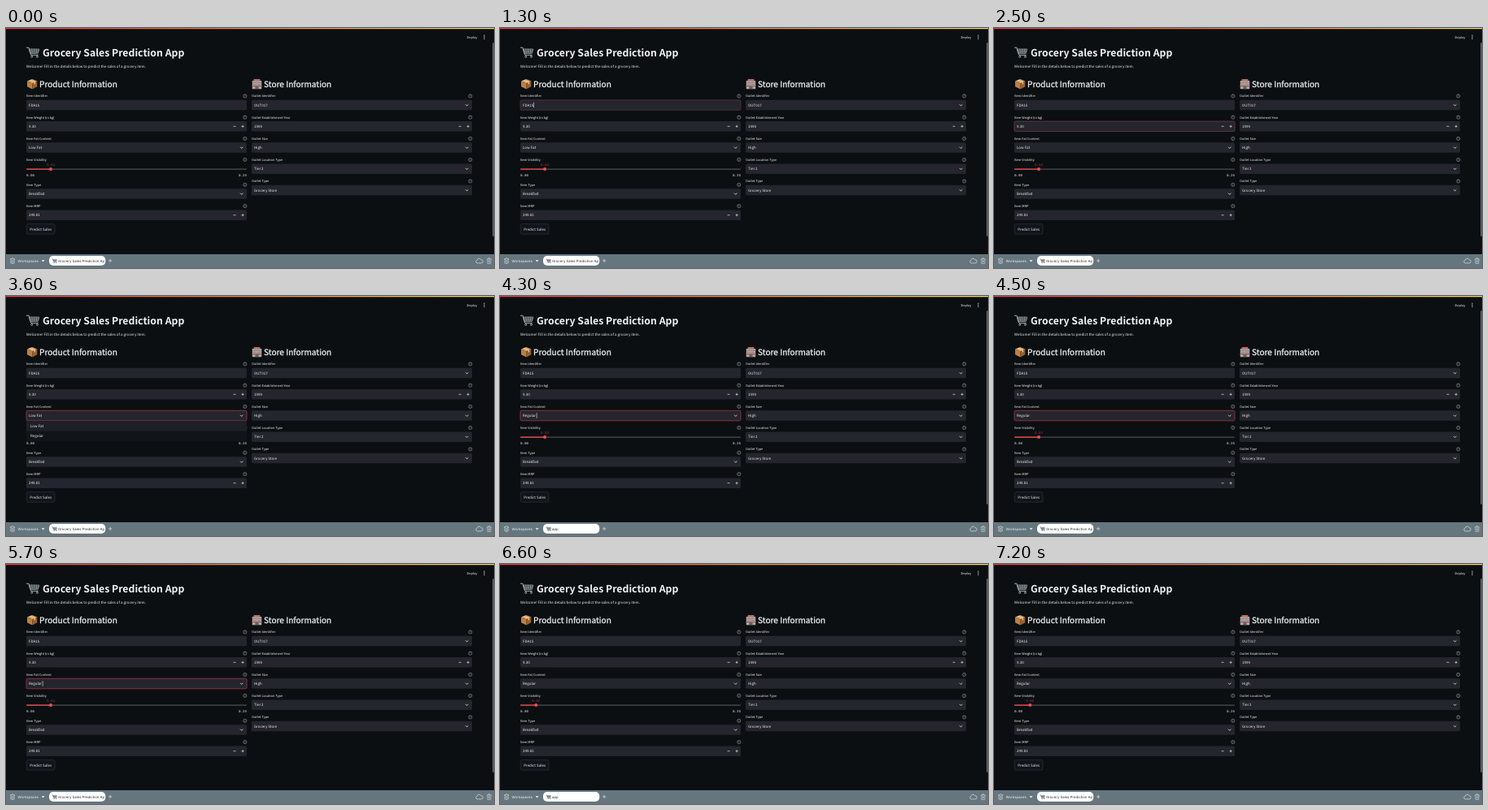
Animation of 600x296 px, one loop 8 s. Source, as an HTML page:

```html
<!DOCTYPE html>
<html lang="en">
<head>
<meta charset="utf-8">
<title>Sales form</title>
<style>
  html, body { margin: 0; width: 100%; height: 100%; overflow: hidden; background: #0b0f12; }
  svg { display: block; width: 600px; height: 296px; }
  text { font-family: "Noto Sans CJK JP", "Noto Sans CJK SC", "Noto Sans CJK", "Noto Sans", sans-serif;
         fill: #f1f2f3; text-rendering: geometricPrecision; white-space: pre; }
  .title { font-size: 12.27px; font-weight: 700; }
  .head { font-size: 10.1px; stroke: #f1f2f3; stroke-width: .25px; }
  .label { font-size: 3.95px; }
  .body { font-size: 4.48px; }
  .mono { font: 4.2px "Liberation Mono", monospace; }
  .ui { font: 4.3px Inter, sans-serif; }
  .line { fill: none; stroke: #e6e8ea; stroke-width: .65; }
  .focus { fill: none; stroke-width: .8; }
</style>
</head>
<body>
<svg id="stage" viewBox="0 0 600 296" xmlns="http://www.w3.org/2000/svg"></svg>
<script>
const LOOP = 8000;
const LEFT = 25, RIGHT = 302, WIDTH = 271, BOX = 12.5;
const ROW = [88.8, 115.05, 141.3, 167.4, 193.8];

const rect = (x, y, w, h, fill, more = '') =>
  `<rect x="${x}" y="${y}" width="${w}" height="${h}" fill="${fill}" ${more}/>`;
const text = (x, y, cls, str, more = '') =>
  `<text x="${x}" y="${y}" class="${cls}" ${more}>${str}</text>`;
const line = (d, more = '') => `<path class="line" d="${d}" ${more}/>`;
const caret = (id, x, y) => rect(x, y, .6, 6.6, '#e8e8ea', `id="${id}"`);
const focusRing = (id, y, color) =>
  rect(LEFT, y, WIDTH, BOX, 'none', `id="${id}" class="focus" rx="1.5" stroke="${color}"`);

function label(x, y, name) {
  const cx = x + WIDTH - 2.2;
  return text(x, y + 1.4, 'label', name) +
    `<circle class="line" cx="${cx}" cy="${y}" r="2.1" style="stroke-width:.4"/>` +
    text(cx, y + 1.2, 'label', '?', 'text-anchor="middle" style="font-size:3.1px"');
}

function field(x, y, name, value, kind, id = '') {
  const mid = y + BOX / 2, end = x + WIDTH;
  const icons = {
    text: '',
    select: line(`M${end - 8} ${mid - .8}l1.7 1.7l1.7 -1.7`, 'style="stroke-width:.85"'),
    number: line(`M${end - 16.4} ${mid}h3M${end - 6.4} ${mid}h3M${end - 4.9} ${mid - 1.5}v3`, 'style="stroke-width:.7"')
  };
  return label(x, y - 4.9, name) +
    rect(x, y, WIDTH, BOX, '#24252d', 'rx="1.5"') +
    text(x + 3, mid + 1.6, 'body', value, id && `id="${id}"`) + icons[kind];
}

const cart = (x, y, s, ink) => `
  <g transform="translate(${x} ${y}) scale(${s})" fill="none" stroke="${ink}" stroke-linecap="round">
    <path d="M0 1.4H2.6L5.4 10.6H14" stroke-width="1"/>
    <path d="M3.2 3.2H15.4L13.8 8.6H4.8Z" fill="${ink}" fill-opacity=".25" stroke-width=".7"/>
    <path d="M4 5H15M4.5 6.8H14.4M6.4 3.2L7 8.6M9.4 3.2V8.6M12.4 3.2L11.7 8.6" stroke-width=".55"/>
    <circle cx="6.3" cy="12.6" r="1" stroke-width=".9"/><circle cx="13" cy="12.6" r="1" stroke-width=".9"/>
  </g>`;

const parcel = `
  <path d="M26 65.5L32 63L38.3 65.5L32.4 68.4Z" fill="#d9a168"/>
  <path d="M26 65.5L32.4 68.4V75.4L26 72.2Z" fill="#bd7f45"/>
  <path d="M38.3 65.5L32.4 68.4V75.4L38.3 72.2Z" fill="#98602f"/>
  <path d="M28.4 64.5L34.8 67.2V69.6L36 69V66.6L29.8 63.9Z" fill="#efd0a0"/>`;

function shop() {
  let windows = '';
  for (let i = 0; i < 8; i++)
    windows += rect(304 + (i % 4) * 2.5, 66.6 + (i >> 2) * 2.3, 1.6, 1.3, '#62808f');
  return rect(302.8, 65, 11.4, 10.2, '#b9a9a2') + rect(304.6, 63, 7.8, 2.4, '#c9665c') + windows +
    rect(302.3, 71, 12.4, 1.3, '#a94f4a') + rect(306.4, 72.3, 4.2, 2.9, '#5a5f68');
}

const slider = `
  ${label(LEFT, 162.4, 'Item Visibility')}
  ${rect(LEFT, 173.4, WIDTH, 1.25, '#4c4e55', 'rx=".6"')}
  ${rect(LEFT, 173.4, 30, 1.25, '#f04848', 'id="filled" rx=".6"')}
  <circle id="thumb" cy="174" r="2" fill="#ff4b4b"/>
  ${text(0, 170.4, 'mono', '', 'id="amount" text-anchor="middle" style="fill:#a0353a"')}
  ${text(LEFT, 182.6, 'mono', '0.00')}
  ${text(LEFT + WIDTH, 182.6, 'mono', '0.25', 'text-anchor="end"')}`;

const menu = `
  <g id="menu">
    ${rect(LEFT, 154.2, WIDTH, 24.8, '#11151a', 'rx="1.5"')}
    ${rect(LEFT, 154.2, WIDTH, 12.3, '#1e2027', 'id="hover"')}
    ${text(30, 161.8, 'body', 'Low Fat')}
    ${text(30, 174.2, 'body', 'Regular')}
  </g>`;

const form = `
  <g id="form">
    ${parcel}${text(41, 72.6, 'head', 'Product Information')}
    ${shop()}${text(317, 72.6, 'head', 'Store Information')}
    ${field(LEFT, ROW[0], 'Item Identifier', 'FDA15', 'text')}
    ${field(LEFT, ROW[1], 'Item Weight (in kg)', '9.30', 'number')}
    ${field(LEFT, ROW[2], 'Item Fat Content', 'Low Fat', 'select', 'fat')}
    ${slider}
    ${field(LEFT, 198.2, 'Item Type', 'Breakfast', 'select')}
    ${field(LEFT, 224.5, 'Item MRP', '249.81', 'number')}
    ${rect(25.2, 241.7, 34.8, 12.5, '#11151b', 'rx="2" stroke="#3c3f46" stroke-width=".5"')}
    ${text(42.6, 249.5, 'body', 'Predict Sales', 'text-anchor="middle"')}
    ${field(RIGHT, ROW[0], 'Outlet Identifier', 'OUT017', 'select')}
    ${field(RIGHT, ROW[1], 'Outlet Establishment Year', '1999', 'number')}
    ${field(RIGHT, ROW[2], 'Outlet Size', 'High', 'select')}
    ${field(RIGHT, ROW[3], 'Outlet Location Type', 'Tier 2', 'select')}
    ${field(RIGHT, ROW[4], 'Outlet Type', 'Grocery Store', 'select')}
    ${focusRing('ringId', ROW[0], '#733a48')}
    ${focusRing('ringWeight', ROW[1], '#733a48')}
    ${focusRing('ringFat', ROW[2], '#a5394a')}
    ${caret('caretId', 41, 91.6)}
    ${caret('caretWeight', 36.3, 117.8)}
    ${caret('caretFat', 44.8, 144.2)}
    ${menu}
  </g>`;

const browserBar = `
  ${rect(0, 279, 600, 17, '#66767e')}
  ${line('M5 285.3L8 283.8L11 285.3L8 286.8ZM5 287.3L8 288.8L11 287.3M5 289.2L8 290.7L11 289.2')}
  ${text(14.6, 288.7, 'ui', 'Workspaces')}
  <path d="M43.6 286.2h4l-2 2.3z" fill="#f1f2f3"/>
  ${rect(53, 281, 69.3, 12, '#fff', 'rx="5"')}
  <g id="tabCart">${cart(56.7, 284.4, .38, '#33383c')}</g>
  <circle id="tabBusy" cx="59.2" cy="287" r="3" fill="#23282c"/>
  <path id="tabDash" d="M57.4 287h3.6" stroke="#fff" stroke-width="1"/>
  ${text(64, 288.7, 'ui', '', 'id="tabName" style="fill:#2b3034"')}
  ${line('M126 287h4.4M128.2 284.8v4.4')}
  ${line('M579.4 290a1.9 1.9 0 0 1 -.2 -3.7a2.6 2.6 0 0 1 4.9 -.5a2.1 2.1 0 0 1 .2 4.2Z')}
  ${line('M591.2 285h5.6M593 285v-1.1h2v1.1M591.8 285l.4 5.6h3.6l.4 -5.6M593.3 286.4v2.8M594.7 286.4v2.8', 'style="stroke-width:.5"')}`;

document.getElementById('stage').innerHTML = `
  <defs><linearGradient id="strip">
    <stop offset="0" stop-color="#e0383e"/><stop offset=".5" stop-color="#ee8a42"/><stop offset="1" stop-color="#f3d564"/>
  </linearGradient></defs>
  ${rect(0, 0, 600, 296, '#0b0f12')}
  ${rect(0, 0, 600, 1.2, 'url(#strip)')}
  ${text(566.5, 12.8, 'label', 'Deploy')}
  ${[9.2, 11.2, 13.2].map(y => `<circle cx="588" cy="${y}" r=".6" fill="#f1f2f3"/>`).join('')}
  ${cart(25.4, 22.8, 1, '#a4aeb5')}
  ${text(45, 34.6, 'title', 'Grocery Sales Prediction App')}
  ${text(LEFT, 48.7, 'body', 'Welcome! Fill in the details below to predict the sales of a grocery item.', 'id="welcome"')}
  ${form}
  ${rect(598, 18, 2, 239, '#565a5e', 'id="scroll" rx="1"')}
  ${browserBar}`;

const TITLE = 'Grocery Sales Prediction Ap';

// Each track lists [start in ms, value]; a value holds until the next start.
const tracks = {
  ringId: [[0, 0], [1200, .35], [1300, .7], [1400, 1], [2100, .5], [2200, 0]],
  ringWeight: [[0, 0], [2100, .5], [2200, 1], [3100, .5], [3200, 0]],
  ringFat: [[0, 0], [3100, .4], [3200, .8], [3300, 1], [6500, .5], [6600, 0]],
  caretId: [[0, 0], [1000, 1], [1600, 0], [1900, 1], [2100, 0]],
  caretWeight: [[0, 0], [2200, 1], [2500, 0], [2900, 1], [3100, 0]],
  caretFat: [[0, 0], [4100, 1], [4500, 0], [4900, 1], [5300, 0], [5700, 1], [6100, 0]],
  menu: [[0, 0], [3200, .6], [3300, 1], [4000, .4], [4100, 0]],
  hoverRow: [[0, 0], [3700, 1]],
  fat: [[0, 'Low Fat'], [4000, 'Regular']],
  scroll: [[0, 239], [3500, 0], [4000, 239], [4400, 250], [4500, 239]],
  lift: [[0, 0], [4400, 13.2], [4500, 0]],
  tab: [[0, 'ready'], [4300, 'start'], [4400, 'busy'], [4500, 'ready'],
        [6600, 'start'], [6700, 'busy'], [6800, 'ready']],
  amount: [[0, .03], [6500, .02]]
};
const at = (name, t) => tracks[name].findLast(([start]) => start <= t)[1];
const el = id => document.getElementById(id);
const fade = (id, value) => el(id).setAttribute('opacity', value);
const put = (id, attr, value) => el(id).setAttribute(attr, value);

function draw(t) {
  for (const id of ['ringId', 'ringWeight', 'ringFat', 'caretId', 'caretWeight', 'caretFat', 'menu'])
    fade(id, at(id, t));

  put('hover', 'y', 154.2 + 12.3 * at('hoverRow', t));
  el('fat').textContent = at('fat', t);
  put('scroll', 'height', at('scroll', t));

  const lift = at('lift', t);
  put('form', 'transform', `translate(0 ${-lift})`);
  fade('welcome', lift ? 0 : 1);

  const amount = at('amount', t), x = 22.8 + amount * 1075;
  put('thumb', 'cx', x);
  put('filled', 'width', x - LEFT);
  put('amount', 'x', x);
  el('amount').textContent = amount.toFixed(2);

  const tab = at('tab', t), busy = tab === 'busy';
  fade('tabCart', busy ? 0 : 1);
  fade('tabBusy', busy ? 1 : 0);
  fade('tabDash', busy ? 1 : 0);
  el('tabName').textContent = tab === 'start' ? 'app' : TITLE;
}

const begin = performance.now();
function tick() {
  draw((performance.now() - begin) % LOOP);
  requestAnimationFrame(tick);
}
tick();
</script>
</body>
</html>
```
